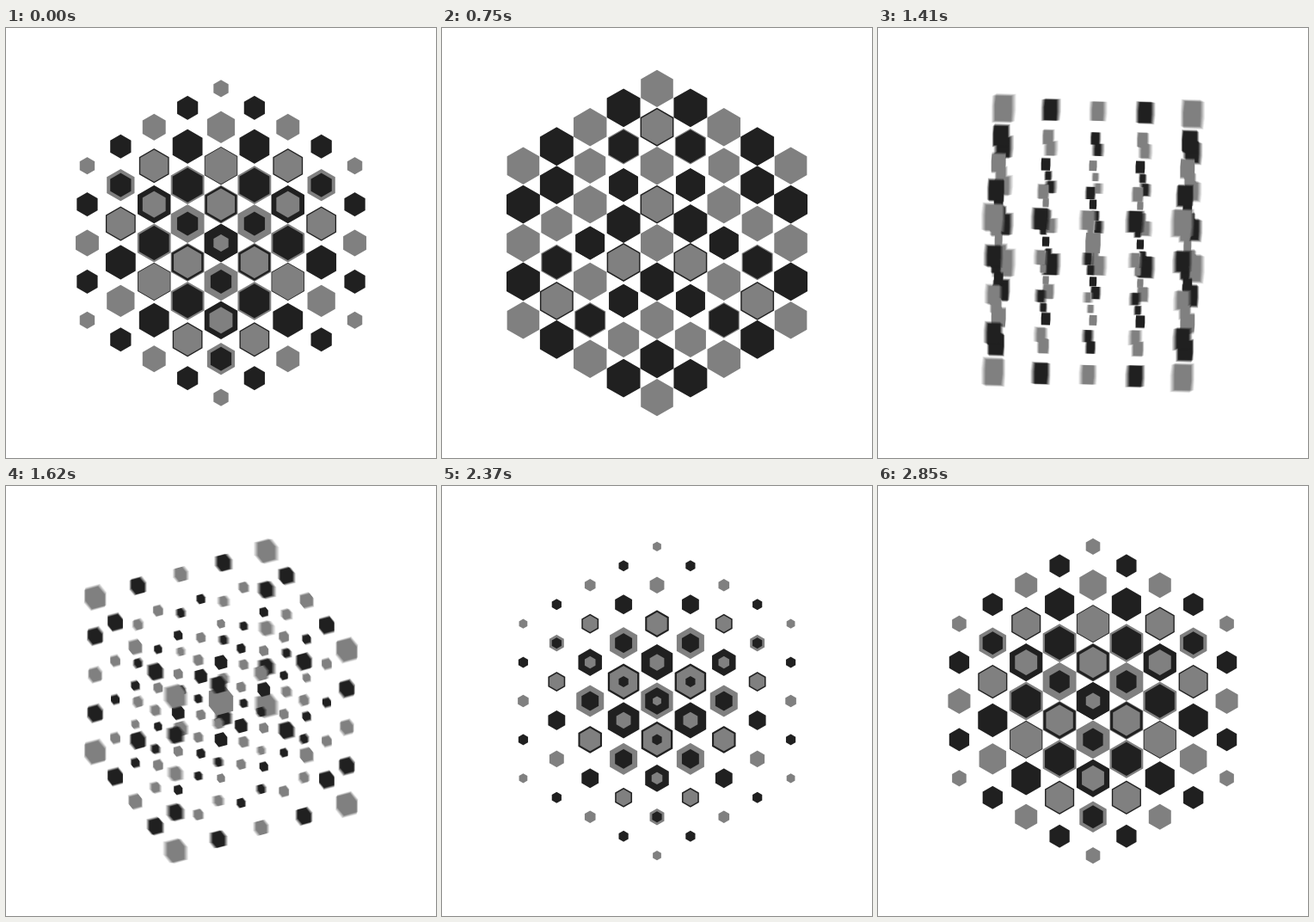
An HTML page with a canvas that plays this animation: 500x500 px, repeating every 2.88 s.

```html
<!DOCTYPE html>
<html lang="en">
<head>
<meta charset="utf-8">
<title>Cube lattice</title>
<style>
  html, body { margin: 0; width: 100%; height: 100%; overflow: hidden; background: #fff; }
  canvas { display: block; width: 500px; height: 500px; }
</style>
</head>
<body>
<canvas id="stage" width="500" height="500"></canvas>
<script>
const SIZE = 500, LOOP = 2880, STEP = 30;
const GAP = 55, SAMPLES = 8, SHUTTER = 0.65;
const SIN_E = Math.sqrt(1 / 3), COS_E = Math.sqrt(2 / 3); // camera elevation

const stage = document.getElementById('stage').getContext('2d');
const layer = document.createElement('canvas');
layer.width = layer.height = SIZE;
const ctx = layer.getContext('2d');

const cubes = [];
for (let x = -2; x <= 2; x++)
  for (let y = -2; y <= 2; y++)
    for (let z = -2; z <= 2; z++)
      cubes.push({ x, y, z, dist: Math.hypot(x, y, z), color: (x + y + z) % 2 ? '#202020' : '#808080' });

// Outline corners of a cube seen from its (+,+,+) corner
const OUTLINE = [[1, -1, -1], [1, 1, -1], [-1, 1, -1], [-1, 1, 1], [-1, -1, 1], [1, -1, 1]];

const smooth = p => p * p * (3 - 2 * p);
const clamp = p => Math.min(1, Math.max(0, p));

function drawScene(ms) {
  const turn = smooth(clamp((ms - LOOP / 3) / (LOOP / 3)));
  const angle = Math.PI / 4 - turn * Math.PI / 2;
  const c = Math.cos(angle), s = Math.sin(angle), side = s < 0 ? -1 : 1;
  const project = (x, y, z) => [c * x - s * z, SIN_E * (s * x + c * z) - COS_E * y];

  ctx.fillStyle = '#fff';
  ctx.fillRect(0, 0, SIZE, SIZE);

  for (const q of cubes) q.depth = SIN_E * q.y + COS_E * (s * q.x + c * q.z);
  cubes.sort((a, b) => a.depth - b.depth);

  for (const q of cubes) {
    const wave = Math.sin(1.055 * q.dist - 2 * Math.PI * ms / LOOP);
    const half = GAP / 4 * (0.625 + 0.375 * wave);
    const [px, py] = project(q.x, q.y, q.z);
    ctx.beginPath();
    for (const [x, y, z] of OUTLINE) {
      const [dx, dy] = project(x * side, y, z);
      ctx.lineTo(SIZE / 2 + GAP * px + half * dx, SIZE / 2 + GAP * py + half * dy);
    }
    ctx.fillStyle = q.color;
    ctx.fill();
  }
}

let shown = -1;
function frame(now) {
  const step = Math.floor((now % LOOP) / STEP);
  if (step !== shown) {
    shown = step;
    // Motion blur: running average over the open shutter
    for (let i = 0; i < SAMPLES; i++) {
      drawScene((step + SHUTTER * i / SAMPLES) * STEP);
      stage.globalAlpha = 1 / (i + 1);
      stage.drawImage(layer, 0, 0);
    }
  }
  requestAnimationFrame(frame);
}
frame(performance.now());
</script>
</body>
</html>
```
